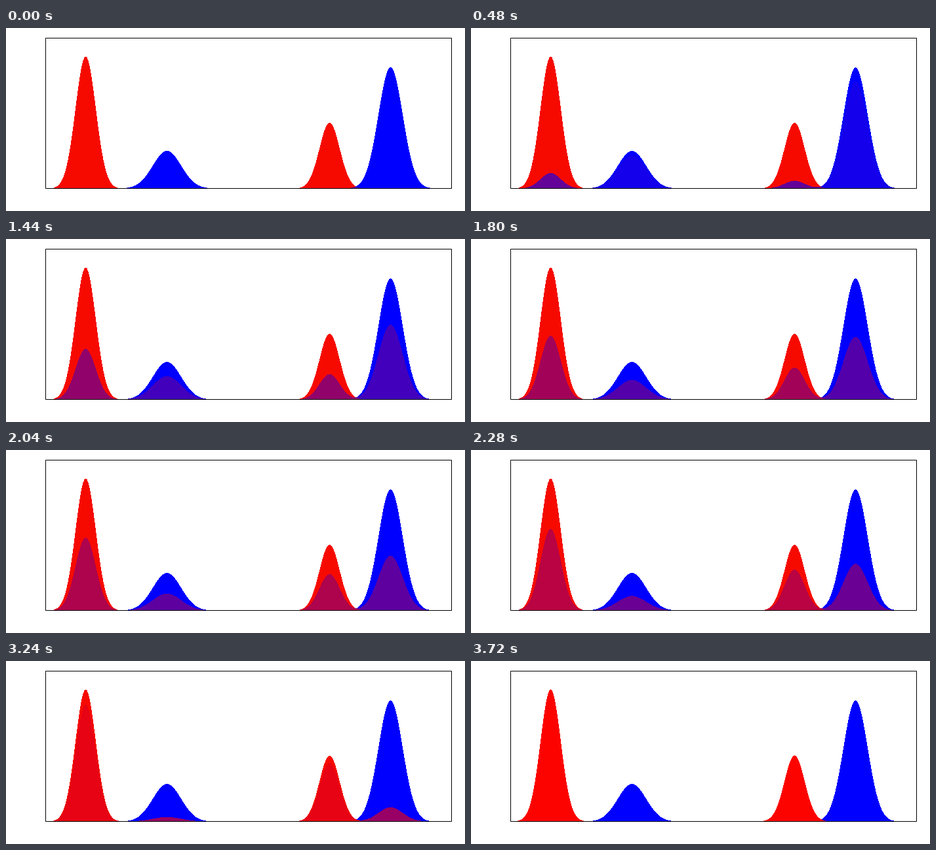
These frames come from a looping animation (700 by 280 pixels, 3.84 s). A matplotlib script:

```python
import matplotlib.pyplot as plt
import numpy as np
from matplotlib.animation import FuncAnimation
from matplotlib.patches import Polygon, Rectangle

WIDTH, HEIGHT, DPI = 700, 280, 100
FRAMES, INTERVAL = 32, 120
LEFT, SPAN, BASE = 59.5, 620, 245
ALPHA = 0.68
RED, BLUE = np.array([1, 0, 0]), np.array([0, 0, 1])

columns = np.arange(61, 679)
edges = np.repeat(np.arange(61, 680), 2)
u = (columns + 0.5 - LEFT) / SPAN


def bump(center, sigma, height):
    return height * np.exp(-0.5 * ((u - center) / sigma) ** 2)


def outline(density):
    """Area under a density, stepped to whole pixels for hard edges."""
    rows = np.floor(np.clip(density, 0, None))
    steps = np.concatenate([[0], np.repeat(rows, 2), [0]])
    return np.column_stack([edges, BASE - steps])


def add_area(density, color, **style):
    area = Polygon(outline(density), closed=True, facecolor=color,
                   edgecolor="none", snap=False, **style)
    return ax.add_patch(area)


red = bump(0.1, 0.025, 202.1) + bump(0.7, 0.025, 101.1)
blue = bump(0.3, 0.035, 57.7) + bump(0.85, 0.03, 185.6)

fig = plt.figure(figsize=(WIDTH / DPI, HEIGHT / DPI), dpi=DPI, facecolor="white")
ax = fig.add_axes([0, 0, 1, 1])
ax.set(xlim=(0, WIDTH), ylim=(HEIGHT, 0))
ax.axis("off")

# The still areas have no outline, so they end slightly lower than the blend.
add_area(blue - 0.4, BLUE, zorder=1)
add_area(red - 0.4, (0.965, 0.04, 0), zorder=2)
blend = add_area(blue, BLUE, alpha=ALPHA, zorder=3)
ax.add_patch(Rectangle((60, 15), 619, 230, fill=False, edgecolor="black",
                       linewidth=72 / DPI, snap=True, zorder=4))


def update(frame):
    t = np.clip((frame - 0.5) / 30, 0, 1)
    blend.set_xy(outline((1 - t) * blue + t * red))
    blend.set_facecolor((1 - t) * BLUE + t * RED)
    return (blend,)


anim = FuncAnimation(fig, update, frames=FRAMES, interval=INTERVAL,
                     repeat=True, repeat_delay=0)
plt.show()
```
